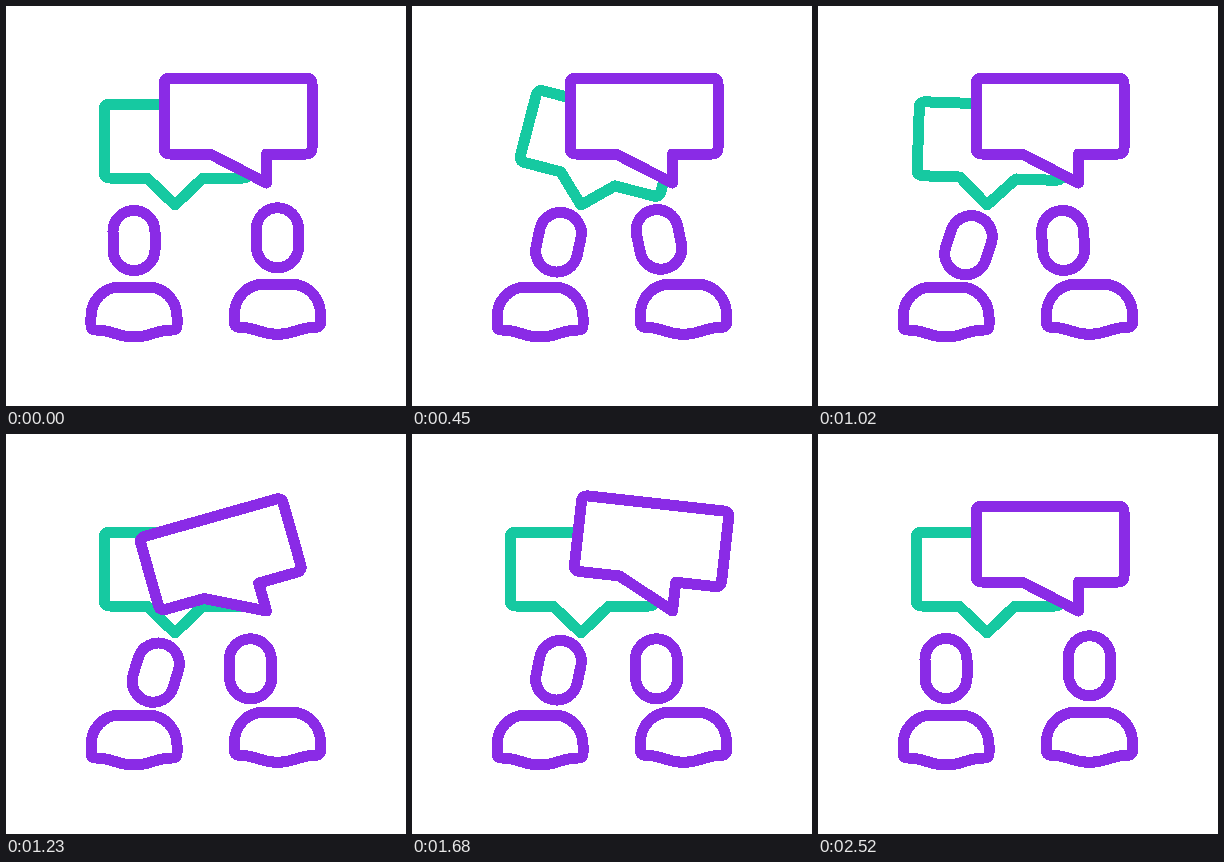
An HTML page for the animation above (2550 ms loop, 400x400 px).

```html
<!DOCTYPE html>
<html lang="en">
<head>
<meta charset="utf-8">
<title>Conversation</title>
<style>
  html, body { margin: 0; width: 100%; height: 100%; overflow: hidden; background: #fff; }
  svg { display: block; width: 100%; height: 100%; }
</style>
</head>
<body>
<svg viewBox="0 0 400 400" fill="#fff" stroke="#8a2be6" stroke-width="11" stroke-linejoin="round" shape-rendering="crispEdges">
  <defs>
    <rect id="head" x="-21" y="-30" width="42" height="60" rx="21"/>
    <path id="body" d="M90 324Q85 324 85 319V311C85 294 98 281 114 281H142C158 281 171 294 171 311V319Q171 324 166 324C148 324 146 331 128 331C110 331 108 324 90 324Z"/>
  </defs>
  <path id="greenBubble" stroke="#16c9a1" d="M104 98H237Q243 98 243 104V166Q243 172 237 172H197L169 199L141 172H104Q98 172 98 166V104Q98 98 104 98Z"/>
  <path id="purpleBubble" d="M164 72H300Q306 72 306 78V142Q306 148 300 148H260.5V177L204 148H164Q158 148 158 142V78Q158 72 164 72Z"/>
  <use id="leftBody" href="#body"/>
  <use id="leftHead" href="#head"/>
  <use id="rightBody" href="#body"/>
  <use id="rightHead" href="#head"/>
</svg>
<script>
const LOOP = 2550;

const progress = (t, from, to) => Math.min(1, Math.max(0, (t - from) / (to - from)));
const ease = (t, from, to) => (1 - Math.cos(Math.PI * progress(t, from, to))) / 2;
const bump = (t, from, to) => Math.sin(Math.PI * progress(t, from, to)) ** 2;

// Pendulum whose amplitude fades evenly to nothing.
function swing(t) {
  const p = progress(t, 0, 1070);
  return -24 * (1 - p) * Math.sin(2 * Math.PI * p * 1070 / 570);
}

const place = (id, transform) =>
  document.getElementById(id).setAttribute("transform", transform);

function placePerson(side, dx, dy, head, squash) {
  place(side + "Head",
    `translate(${128 + dx + head.x} ${234.5 + dy + head.y + 2 * squash}) rotate(${head.angle})
     scale(${1 + 0.035 * squash} ${1 - 0.05 * squash})`);
  place(side + "Body",
    `translate(${128 + dx} ${336 + dy}) scale(${1 + 0.03 * squash} ${1 - 0.035 * squash}) translate(-128 -336)`);
}

function draw(t) {
  place("greenBubble", `rotate(${swing(t - 40)} 169 199)`);
  place("purpleBubble", `rotate(${swing(t - 1160)} 260.5 177)`);

  const arrive = ease(t, 0, 420);
  const hop = bump(t, 0, 390);

  const leftLean = arrive - ease(t, 2040, 2370);
  const nod = bump(t, 420, 1680);
  placePerson("left", 0, 0, {
    x: 18.5 * leftLean + 4 * nod,
    y: 1.7 * leftLean + 3 * nod,
    angle: 12 * leftLean + 6 * nod
  }, hop + bump(t, 2040, 2400));

  const back = ease(t, 1800, 2130);
  const rightLean = arrive - back;
  const upright = ease(t, 780, 1140) - back;
  placePerson("right", 143.5, -2.7, {
    x: -24.5 * rightLean - 2.5 * upright,
    y: 1.6 * rightLean + 1.4 * upright,
    angle: -12 * rightLean + 11 * upright
  }, hop + bump(t, 1800, 2190));
}

const begin = performance.now();
function tick() {
  draw((performance.now() - begin) % LOOP);
  requestAnimationFrame(tick);
}
tick();
</script>
</body>
</html>
```
